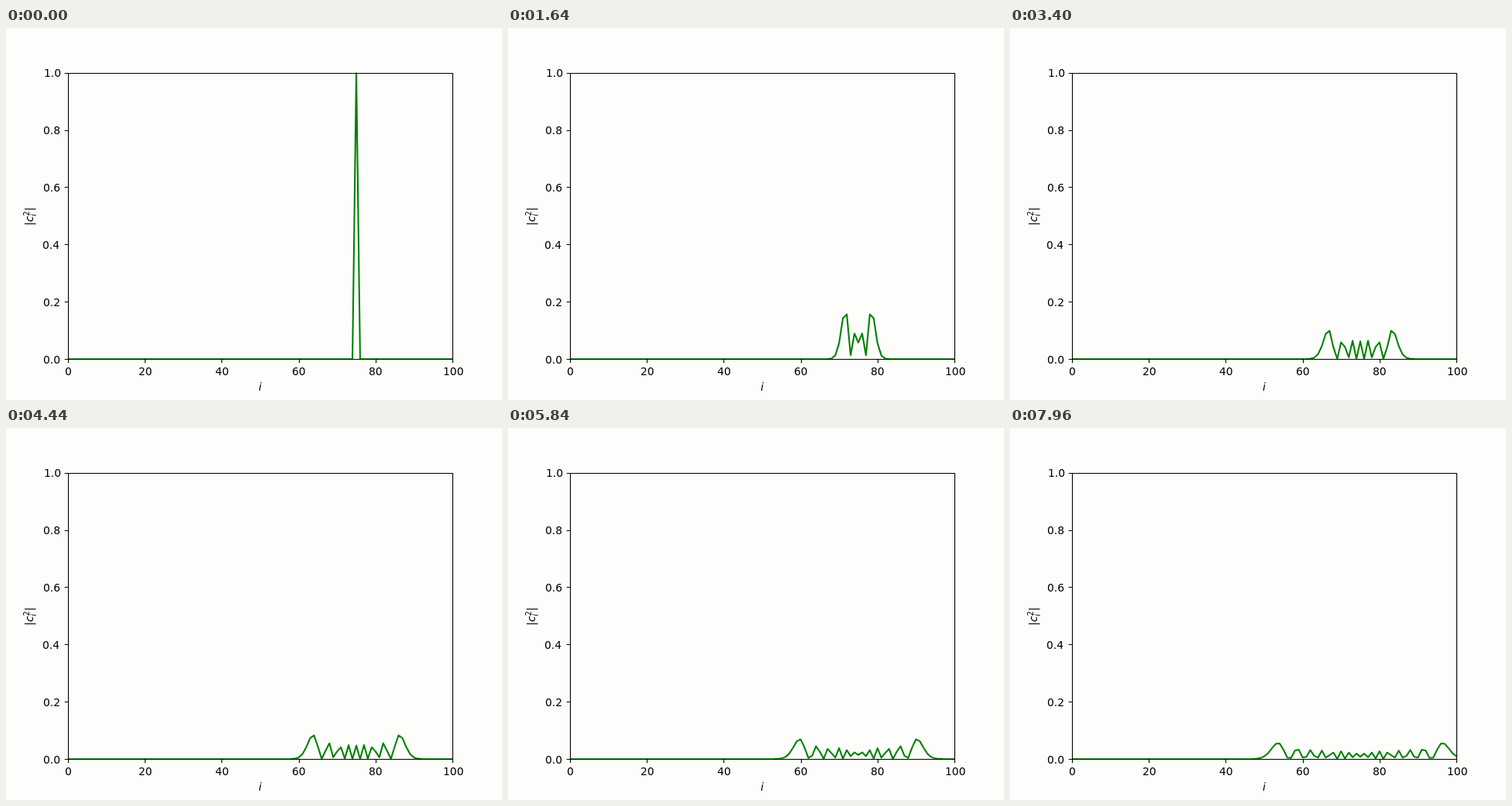
Animation, 640 px wide and 480 px high, one loop 8000 ms. Source, as an HTML page:

```html
<!DOCTYPE html>
<html lang="en">
<head>
<meta charset="utf-8">
<title>Spreading wave packet</title>
<style>
  html, body { margin: 0; width: 100%; height: 100%; overflow: hidden; background: #fdfefc; }
  svg { display: block; }
  text { font: 13.89px "DejaVu Sans", sans-serif; }
  .math { font-style: italic; }
  .small { font-size: 9.72px; }
</style>
</head>
<body>
<svg width="640" height="480" viewBox="0 0 640 480">
  <clipPath id="plot"><rect x="80" y="57.6" width="496" height="369.6"/></clipPath>
  <polyline id="curve" clip-path="url(#plot)" fill="none" stroke="#008000" stroke-width="2.08" stroke-linejoin="round"/>
  <path id="axes" fill="none" stroke="#000" stroke-width="1.11"/>
  <g id="labels"></g>
  <text class="math" x="328" y="468" text-anchor="middle">i</text>
  <g transform="translate(35 255) rotate(-90)">
    <text x="0">|</text>
    <text class="math" x="4.7">c</text>
    <text class="small" x="12.5" y="-5.4">2</text>
    <text class="small math" x="12.3" y="3.8">i</text>
    <text x="19.1">|</text>
  </g>
</svg>
<script>
const SITES = 100, START = 75;
const FRAME_MS = 40, FRAMES = 200, TIME_STEP = 0.12;
const SAMPLES = 200;

const byId = id => document.getElementById(id);
const plotX = site => 80 + 4.96 * site;
const plotY = value => 427.2 - 369.6 * value;
const snap = v => Math.floor(v + 0.5) + 0.5;

const ruler = document.createElement('canvas').getContext('2d');
ruler.font = '13.89px "DejaVu Sans", sans-serif';

// Width of the drawn glyphs, in whole pixels
function inkWidth(text) {
  const box = ruler.measureText(text);
  return Math.ceil(box.actualBoundingBoxRight) - Math.floor(-box.actualBoundingBoxLeft);
}

// align is the share of the label lying left of x; labels start on whole pixels
function addLabel(text, x, y, align) {
  const label = document.createElementNS(byId('axes').namespaceURI, 'text');
  label.setAttribute('x', Math.round(x - align * inkWidth(text)));
  label.setAttribute('y', Math.round(y));
  label.textContent = text;
  byId('labels').append(label);
}

function drawAxes() {
  let path = 'M80.5 58.5H576.5V427.5H80.5Z';
  for (let k = 0; k <= 5; k++) {
    const x = plotX(20 * k), y = plotY(k / 5);
    path += `M${snap(x)} 427.5v4.86M80.5 ${snap(y)}h-4.86`;
    addLabel(String(20 * k), x, 448, 0.5);
    addLabel((k / 5).toFixed(1), 70.28, y + 5.4, 1);
  }
  byId('axes').setAttribute('d', path);
}

// Bessel function J_n(x) from its integral form
function bessel(n, x) {
  let sum = 0;
  for (let k = 0; k < SAMPLES; k++) {
    const angle = 2 * Math.PI * k / SAMPLES;
    sum += Math.cos(n * angle - x * Math.sin(angle));
  }
  return sum / SAMPLES;
}

// Probability per site of a particle hopping away from START
function drawCurve(step) {
  const time = TIME_STEP * Math.max(0, step - 1);
  const density = Array.from({ length: START + 1 }, (_, n) => bessel(n, time) ** 2);
  const points = [];
  for (let site = 0; site <= SITES; site++) {
    const value = density[Math.abs(site - START)];
    points.push(`${plotX(site).toFixed(2)},${plotY(value).toFixed(2)}`);
  }
  byId('curve').setAttribute('points', points.join(' '));
}

let shown = -1;
function tick() {
  const step = Math.floor(performance.now() / FRAME_MS) % FRAMES;
  if (step !== shown) drawCurve(shown = step);
  requestAnimationFrame(tick);
}

drawAxes();
tick();
</script>
</body>
</html>
```
